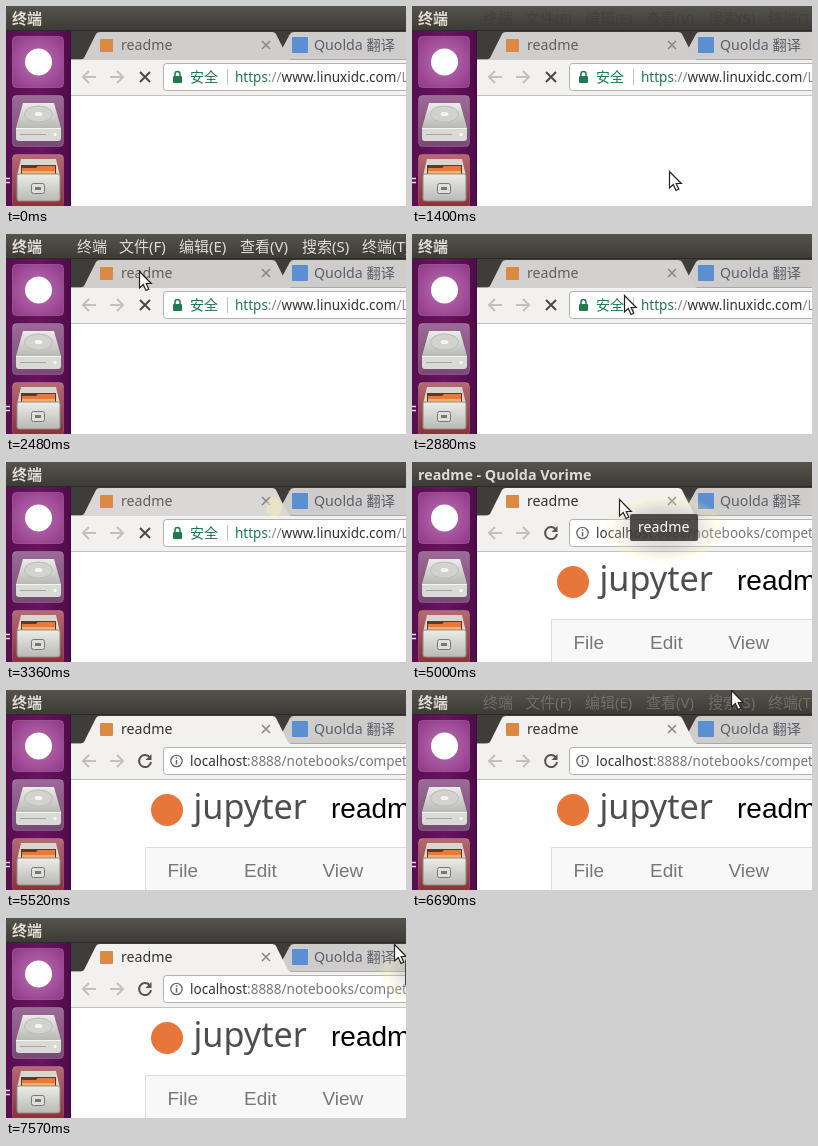
Animation of 400x200 px, one loop 7590 ms. Source, as an HTML page:

```html
<!DOCTYPE html>
<html lang="zh">
<head>
<meta charset="utf-8">
<title>Desktop</title>
<style>
html, body { margin: 0; width: 100%; height: 100%; overflow: hidden; background: #fff; }
svg { display: block; width: 400px; height: 200px; }
text { font-family: "Noto Sans", "Noto Sans CJK SC", "Noto Sans CJK", sans-serif; white-space: pre; }
.tab { font-size: 14.2px; }
.url { font-size: 13.5px; }
.bar { font-size: 15px; }
.sans { font-family: "Liberation Sans", Arial, sans-serif; }
</style>
</head>
<body>
<svg viewBox="0 0 400 200" xmlns="http://www.w3.org/2000/svg">
  <defs>
    <linearGradient id="panelFill" x2="0" y2="1">
      <stop stop-color="#55534b"/><stop offset="1" stop-color="#3c3b36"/>
    </linearGradient>
    <linearGradient id="dockFill">
      <stop stop-color="#560f50"/><stop offset=".5" stop-color="#6b1360"/><stop offset="1" stop-color="#4e0c49"/>
    </linearGradient>
    <radialGradient id="homeFill" cx=".5" cy=".5" r=".75">
      <stop stop-color="#b673ae"/><stop offset=".6" stop-color="#a04c97"/><stop offset="1" stop-color="#8d3184"/>
    </radialGradient>
    <linearGradient id="diskFill" x2="0" y2="1">
      <stop stop-color="#9c6a96"/><stop offset="1" stop-color="#7a4a76"/>
    </linearGradient>
    <linearGradient id="fileFill" x2="0" y2="1">
      <stop stop-color="#b46a72"/><stop offset="1" stop-color="#8d2f35"/>
    </linearGradient>
    <linearGradient id="metal" x2="0" y2="1">
      <stop stop-color="#ecece9"/><stop offset="1" stop-color="#b8b8b4"/>
    </linearGradient>
    <radialGradient id="shadeFill">
      <stop stop-color="#777" stop-opacity=".45"/>
      <stop offset=".6" stop-color="#aaa" stop-opacity=".28"/>
      <stop offset=".85" stop-color="#fff4b0" stop-opacity=".22"/>
      <stop offset="1" stop-color="#fff4b0" stop-opacity="0"/>
    </radialGradient>
  </defs>

  <rect width="400" height="200" fill="#fff"/>

  <!-- notebook page -->
  <g id="page">
    <circle cx="161" cy="120" r="16" fill="#e8763a"/>
    <text x="187.500" y="128.500" font-size="34.2" fill="#4e4e4e">jupyter</text>
    <text class="sans" x="325" y="128" font-size="28" fill="#000">readme</text>
    <path d="M139.500 210V157.500H401V210z" fill="#f8f8f8" stroke="#dedede"/>
    <g font-size="19" fill="#777">
      <text class="sans" x="161.500" y="186.500">File</text>
      <text class="sans" x="238" y="186.500">Edit</text>
      <text class="sans" x="316.500" y="186.500">View</text>
    </g>
  </g>

  <!-- browser frame -->
  <rect x="65" y="24" width="335" height="30" fill="#3e3d39"/>
  <path d="M270 54L284 28Q285 26 288 26H400V54z" fill="#cfcdcb"/>
  <rect x="286" y="31" width="16" height="16" rx="1" fill="#5a8fd0"/>
  <text class="tab" x="308" y="44" fill="#5b5f6b">Quolda 翻译</text>
  <rect x="65" y="53" width="335" height="37" fill="#f2f1ef"/>
  <path d="M65 53.500H400" stroke="#aaa8a5"/>
  <path id="tab" d="M75 54L78 52L90 28Q91 26 94 26H266Q269 26 270 28L282 52L285 54z"/>
  <rect x="94" y="33" width="13" height="13" rx="1" fill="#dc8a42"/>
  <text id="tabText" class="tab" x="115" y="44">readme</text>
  <path d="M256 35l8 8m0-8l-8 8" stroke="#8a8886" stroke-width="1.600"/>
  <path d="M65 89.500H400" stroke="#c4c2bf"/>
  <g fill="none" stroke="#c3c1be" stroke-width="2">
    <path d="M90 71H77m6-6l-6 6l6 6"/>
    <path d="M104 71H117m-6-6l6 6l-6 6"/>
  </g>
  <rect x="157.500" y="57.500" width="250" height="27" rx="3" fill="#fff" stroke="#b3b1ae"/>
  <g id="loading">
    <path d="M134 66l10 10m0-10l-10 10" stroke="#4a4a4a" stroke-width="2"/>
    <rect x="167" y="70" width="9" height="7" rx="1" fill="#1f7a4d"/>
    <path d="M169 70v-2a2.500 2.500 0 0 1 5 0v2" fill="none" stroke="#1f7a4d" stroke-width="1.500"/>
    <text x="184" y="76" font-size="14" fill="#1f7a4d">安全</text>
    <path d="M221.500 63V79" stroke="#b9c9be"/>
    <text class="url" x="229" y="76" fill="#888"><tspan fill="#1f7a4d">https</tspan>://<tspan fill="#333">www.linuxidc.com</tspan>/L</text>
  </g>
  <g id="loaded">
    <path d="M143.500 67A6 6 0 1 0 145 72" fill="none" stroke="#555" stroke-width="2"/>
    <path d="M145.500 64v6h-6z" fill="#555"/>
    <circle cx="170.500" cy="71" r="5.700" fill="none" stroke="#666" stroke-width="1.300"/>
    <path d="M170.500 70V74.500M170.500 67.300V68.800" stroke="#666" stroke-width="1.500"/>
    <text class="url" x="184" y="76" fill="#777"><tspan fill="#333">localhost</tspan>:8888/notebooks/competition</text>
  </g>

  <!-- launcher -->
  <rect y="24" width="65" height="176" fill="url(#dockFill)"/>
  <path d="M64.500 24V200" stroke="#3d0a3a"/>
  <g stroke="#fff" stroke-opacity=".18">
    <rect x="6.500" y="30.500" width="51" height="51" rx="4" fill="url(#homeFill)"/>
    <rect x="6.500" y="89.500" width="51" height="51" rx="4" fill="url(#diskFill)"/>
    <rect x="6.500" y="148.500" width="51" height="53" rx="4" fill="url(#fileFill)"/>
  </g>
  <circle cx="32.500" cy="56" r="13.500" fill="#fff"/>
  <path d="M17 97H48L55 122H10z" fill="url(#metal)"/>
  <ellipse cx="32.500" cy="108" rx="14" ry="8" fill="#d2d2cf" stroke="#bcbcb8"/>
  <ellipse cx="32.500" cy="108" rx="4" ry="2" fill="#f4f4f2"/>
  <path d="M10 122H55V132Q55 135 52 135H13Q10 135 10 132z" fill="#d9d9d6"/>
  <path d="M10 122.500H55" stroke="#f4f4f2"/>
  <path d="M14 128.500H40" stroke="#a5a5a2"/>
  <circle cx="49" cy="128.500" r="1.500" fill="#fff"/>
  <path d="M15 153H50L54 170H11z" fill="#d8d6d1"/>
  <path d="M15 159H50V170H15z" fill="#5e3a24"/>
  <path d="M16 162H30L32 160H49V170H16z" fill="#e8793a"/>
  <path d="M16 165H49V170H16z" fill="#f3b06a"/>
  <rect x="11" y="168" width="43" height="27" rx="2" fill="url(#metal)" stroke="#8d8b86"/>
  <rect x="25.500" y="177.500" width="13" height="10" rx="2" fill="#dededb" stroke="#777"/>
  <rect x="29" y="181" width="6" height="3" fill="#777"/>
  <path d="M0 172.500H4M0 176.500H4" stroke="#e6dce5" stroke-width="1.500"/>

  <!-- top panel -->
  <rect width="400" height="24" fill="url(#panelFill)"/>
  <path d="M0 24.500H400" stroke="#2c2b27"/>
  <text id="title" x="6" y="17.500" font-weight="700" fill="#dfdbd2"></text>
  <g id="menu" class="bar"></g>

  <!-- pointer and its label -->
  <ellipse id="trace" cx="268" cy="45" rx="8" ry="10" fill="#fff4b0"/>
  <g id="tip">
    <ellipse cx="34" cy="15" rx="62" ry="36" fill="url(#shadeFill)"/>
    <rect width="68" height="27" rx="2" fill="#383734" fill-opacity=".93"/>
    <text class="tab" x="8" y="18" fill="#fff">readme</text>
  </g>
  <path id="pointer" d="M.5.500V17L4.300 13.500L7 19.500L9.800 18.300L7.200 12.500H12.300z" fill="#fff" stroke="#222" stroke-width="1.200"/>
</svg>
<script>
const LOOP = 7590;
const $ = id => document.getElementById(id);
const show = (id, on) => $(id).setAttribute("visibility", on ? "visible" : "hidden");
const fade = (id, a) => $(id).setAttribute("opacity", a);
const move = (id, x, y) => $(id).setAttribute("transform", `translate(${x} ${y})`);

// Each stroke of the pointer: [time, x, y]
const strokes = [
  [[1320, 296, 196], [1400, 257, 165], [1700, 140, 150], [2040, 17, 147], [2080, 14, 146],
   [2280, 95, 2], [2360, 118, 4], [2480, 133, 37], [2800, 180, 60], [3100, 300, 62], [3280, 402, 40]],
  [[3600, 400, 110], [3760, 350, 166], [4000, 280, 110], [4280, 212, 40], [5000, 207, 37],
   [5160, 230, 60], [5320, 310, 102], [5520, 402, 90]],
  [[6690, 319, 0], [7000, 340, 12], [7250, 380, 40], [7410, 396, 46], [7570, 388, 26], [7600, 388, 26]]
];
const menuKeys = [[1030, 0], [1110, .1], [1420, .1], [1600, 1], [2560, 1], [2790, 0],
  [6689, 0], [6690, .4], [6850, 1], [7230, 1], [7400, 0]];
const hoverKeys = [[2840, 0], [3000, 1]];
const tipKeys = [[4800, 0], [5000, .95], [5080, 1], [5240, 0], [7480, 0], [7570, 1]];
const traceKeys = [[3200, 0], [3320, .4], [3400, .4], [3560, 0]];

function at(keys, t) {
  if (t <= keys[0][0]) return keys[0].slice(1);
  for (let i = 1; i < keys.length; i++) {
    const a = keys[i - 1], b = keys[i];
    if (t < b[0]) {
      const p = (t - a[0]) / (b[0] - a[0]);
      return a.slice(1).map((v, k) => v + (b[k + 1] - v) * p);
    }
  }
  return keys[keys.length - 1].slice(1);
}

const labels = ["终端", "文件(F)", "编辑(E)", "查看(V)", "搜索(S)", "终端(T)"];
const spots = [71, 113, 173, 234, 296, 356];
$("menu").innerHTML = labels.map((s, i) => `<text x="${spots[i]}" y="18">${s}</text>`).join("");

function draw(now) {
  const raw = now % LOOP;
  const shift = raw < 5600 ? 0 : 10;
  const t = raw < 1120 ? raw : Math.floor((raw - shift) / 40) * 40 + shift;

  const focus = t >= 4280 && t < 5240;
  const active = t >= 4360;
  const title = $("title");
  title.textContent = focus ? "readme - Quolda Vorime" : "终端";
  title.setAttribute("font-size", focus ? 14.3 : 15);

  const [m] = at(menuKeys, t);
  const ink = Math.round(38 + 185 * m);
  $("menu").setAttribute("fill", `rgb(${ink},${ink - 3},${ink - 10})`);
  fade("menu", Math.min(1, 4 * m));

  const tone = Math.round(207 + 10 * at(hoverKeys, t)[0]);
  $("tab").setAttribute("fill", active ? "#f2f1ef" : `rgb(${tone},${tone - 1},${tone - 3})`);
  $("tabText").setAttribute("fill", active ? "#333" : "#62605e");
  show("page", active);
  show("loaded", active);
  show("loading", !active);
  fade("trace", at(traceKeys, t)[0]);

  const stroke = strokes.find(s => t >= s[0][0] && t < s[s.length - 1][0]);
  show("pointer", stroke);
  show("tip", stroke);
  if (stroke) {
    const [x, y] = at(stroke, t).map(Math.round);
    move("pointer", x, y);
    move("tip", x + 11, y + 15);
    fade("tip", at(tipKeys, t)[0]);
  }
}

const start = performance.now();
function tick() {
  draw(performance.now() - start);
  requestAnimationFrame(tick);
}
tick();
</script>
</body>
</html>
```
